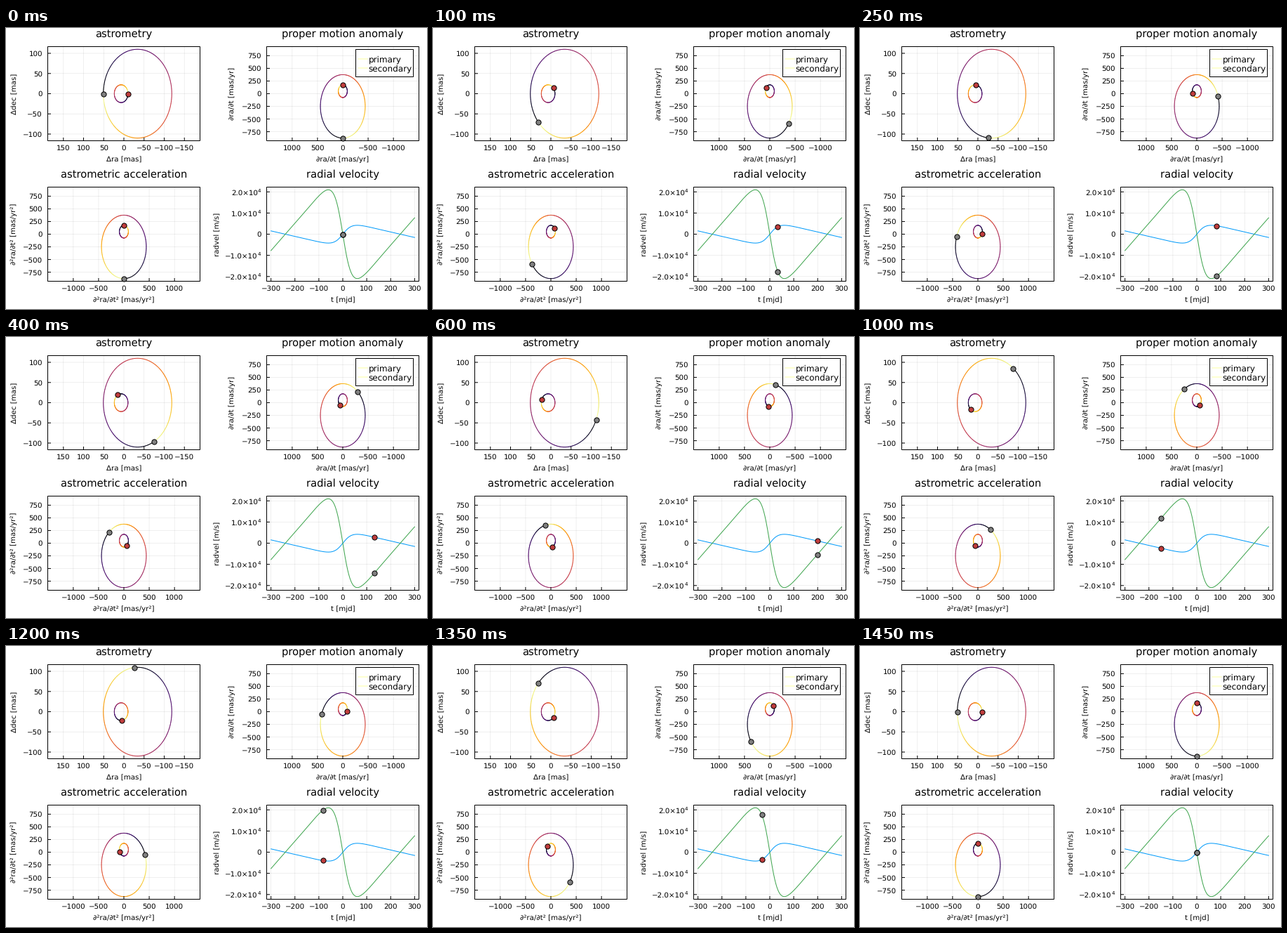
Animation of 600x400 px, one loop 1500 ms. Source, as a matplotlib script:

```python
import numpy as np
import matplotlib.pyplot as plt
from matplotlib.animation import FuncAnimation
from matplotlib.collections import LineCollection
from matplotlib.patches import Rectangle

plt.rcParams["font.family"] = "DejaVu Sans"
plt.rcParams["text.hinting"] = "none"

W, H = 600, 400
FRAMES, INTERVAL = 30, 50
PX = 0.72  # points per pixel at 100 dpi
PANEL_W, PANEL_H = 217, 134
SMALL, LEGEND, TITLE = 10.2, 12, 14.8
TICK = 4

# Orbit: 1.2 au around one solar mass at parallax 100 mas, inclined 45 degrees
SMA, ECC, PARALLAX = 1.2, 0.4, 100
TILT = np.cos(np.pi / 4)
MINOR = np.sqrt(1 - ECC**2)
PERIOD = 365.25 * SMA**1.5
RATE = 2 * np.pi / SMA**1.5  # rad per year
AU_PER_YEAR = 4740.5  # m/s
RATIO = -0.2  # primary motion relative to the secondary

RED, GRAY = "#c03d3d", "#808080"
BLUE, GREEN = "#009afa", "#3da44d"

fig = plt.figure(figsize=(W / 100, H / 100), dpi=100, facecolor="white")
ax = fig.add_axes([0, 0, 1, 1])
ax.set_xlim(0, W)
ax.set_ylim(H, 0)
ax.axis("off")


def ecc_anomaly(mean):
    """Solve Kepler's equation by Newton steps."""
    mean = np.asarray(mean, float)
    e = mean + ECC * np.sin(mean)
    for _ in range(20):
        e = e - (e - ECC * np.sin(e) - mean) / (1 - ECC * np.cos(e))
    return e


def position(e):
    a = SMA * PARALLAX
    return a * TILT * (np.cos(e) - ECC), -a * MINOR * np.sin(e)


def motion(e):
    k = SMA * PARALLAX * RATE / (1 - ECC * np.cos(e))
    return -k * TILT * np.sin(e), -k * MINOR * np.cos(e)


def radvel(e):
    k = SMA * RATE * AU_PER_YEAR * TILT
    return -k * np.sin(e) / (1 - ECC * np.cos(e))


def text(x, y, s, size=SMALL, ha="center", va="baseline", **kw):
    ax.text(x, y, s, fontsize=size * PX, ha=ha, va=va, zorder=8, **kw)


def line(xs, ys, color="black", width=1.0, **kw):
    return ax.plot(xs, ys, color=color, lw=width * PX, snap=False, **kw)[0]


def box(x, y, w, h, face="none", z=4):
    ax.add_patch(Rectangle((x, y), w, h, fc=face, ec="black", lw=PX,
                           snap=False, zorder=z))


def number(v):
    return f"{v:g}".replace("-", "\u2212")


def power_label(x, y, v):
    """Tick label such as 2.0x10^4, right aligned at x."""
    base = f"{v / 1e4:.1f}\u00d710".replace("-", "\u2212")
    text(x, y + 0.5, "4", SMALL * 0.7, "right")
    text(x - 4.7, y + 4.5, base, ha="right")


class Panel:
    def __init__(self, left, top, half_x, half_y, flip=False):
        self.left, self.top = left, top
        self.right, self.bottom = left + PANEL_W, top + PANEL_H
        self.cx, self.cy = left + PANEL_W / 2, top + PANEL_H / 2
        self.sx = PANEL_W / 2 / half_x * (-1 if flip else 1)
        self.sy = -PANEL_H / 2 / half_y
        box(left, top, PANEL_W, PANEL_H)

    def px(self, x, y):
        return self.cx + self.sx * x, self.cy + self.sy * y

    def decorate(self, title, xlabel, ylabel, xticks, yticks,
                 ylabel_x, powers=False):
        text(self.cx, self.top - 13.4, title, TITLE)
        text(self.cx, self.bottom + 29.6, xlabel)
        text(ylabel_x, self.cy, ylabel, ha="right", va="center", rotation=90)
        grid = dict(alpha=0.1, width=0.6, zorder=1)
        for v in xticks:
            x = self.px(v, 0)[0]
            line([x, x], [self.top, self.bottom], **grid)
            line([x, x], [self.bottom, self.bottom - TICK], zorder=4)
            text(x, self.bottom + 13.8, number(v))
        for v in yticks:
            y = self.px(0, v)[1]
            line([self.left, self.right], [y, y], **grid)
            line([self.left, self.left + TICK], [y, y], zorder=4)
            if powers and v:
                power_label(self.left - 8, y, v)
            else:
                text(self.left - 7.5, y + 3.8, number(v), ha="right")


def marker(color, z):
    return line([], [], marker="o", ms=7.2 * PX, mfc=color, mec="black",
                mew=PX, ls="none", zorder=z)


class OrbitTrack:
    """A body on its closed path, coloured from the body onward."""
    SWEEP = np.linspace(0, 2 * np.pi, 180)

    def __init__(self, panel, curve, scale, color, z):
        self.panel, self.curve, self.scale = panel, curve, scale
        self.path = LineCollection([], cmap="inferno", lw=PX,
                                   capstyle="round", zorder=z)
        self.path.set_snap(False)
        self.path.set_array(np.linspace(1, 0, len(self.SWEEP) - 1))
        self.path.set_clim(0, 1)
        ax.add_collection(self.path, autolim=False)
        self.dot = marker(color, z + 3)

    def update(self, mean):
        e = ecc_anomaly(mean) + self.SWEEP
        x, y = self.curve(e)
        pts = np.column_stack(self.panel.px(self.scale * x, self.scale * y))
        self.path.set_segments(np.stack([pts[:-1], pts[1:]], axis=1))
        self.dot.set_data(pts[:1, 0], pts[:1, 1])


class VelocityTrack:
    def __init__(self, panel, scale, line_color, color, z):
        self.panel, self.scale = panel, scale
        t = np.linspace(-300, 300, 400)
        v = scale * radvel(ecc_anomaly(2 * np.pi * t / PERIOD))
        line(*panel.px(t, v), color=line_color, zorder=z)
        self.dot = marker(color, z + 3)

    def update(self, mean):
        wrapped = (mean + np.pi) % (2 * np.pi) - np.pi
        v = self.scale * radvel(ecc_anomaly(wrapped))
        x, y = self.panel.px(wrapped * PERIOD / (2 * np.pi), v)
        self.dot.set_data([x], [y])


def panel_limits(reach):
    """Padded half ranges with equal scale on both axes."""
    half = 1.06 * reach
    return half * PANEL_W / PANEL_H, half


LEFT, RIGHT, TOP, LOW = 59.5, 371.5, 26.5, 226.5
sky = panel_limits(SMA * PARALLAX * MINOR)
speed = panel_limits(-motion(0)[1])
max_rv = np.abs(radvel(np.linspace(0, 2 * np.pi, 721))).max()

astrometry = Panel(LEFT, TOP, *sky, flip=True)
proper = Panel(RIGHT, TOP, *speed, flip=True)
accel = Panel(LEFT, LOW, *speed)
radial = Panel(RIGHT, LOW, 318, 1.06 * max_rv)

thousands, quarters = range(-1000, 1001, 500), range(-750, 751, 250)
astrometry.decorate("astrometry", "Δra [mas]", "Δdec [mas]",
                    range(-150, 151, 50), range(-100, 101, 50), 16.5)
proper.decorate("proper motion anomaly", "∂ra/∂t [mas/yr]", "∂ra/∂t [mas/yr]",
                thousands, quarters, 327.4)
accel.decorate("astrometric acceleration", "∂²ra/∂t² [mas/yr²]",
               "∂²ra/∂t² [mas/yr²]", thousands, quarters, 16.5)
radial.decorate("radial velocity", "t [mjd]", "radvel [m/s]",
                range(-300, 301, 100), range(-20000, 20001, 10000), 305.5,
                powers=True)

# Legend
box(498.5, 30.5, 82, 39, face="white", z=7)
for name, y in (("primary", 44), ("secondary", 57)):
    line([502, 515], [y, y], color="#fcffa4", zorder=8)
    text(516.5, y + 4.3, name, LEGEND, "left")

tracks = []
for panel, curve in ((astrometry, position), (proper, motion), (accel, motion)):
    tracks.append(OrbitTrack(panel, curve, RATIO, RED, 2))
    tracks.append(OrbitTrack(panel, curve, 1, GRAY, 2.5))
tracks.append(VelocityTrack(radial, RATIO, BLUE, RED, 2))
tracks.append(VelocityTrack(radial, 1, GREEN, GRAY, 2.5))


def update(i):
    mean = 2 * np.pi * (i % (FRAMES - 1)) / (FRAMES - 1)
    for track in tracks:
        track.update(mean)
    return []


anim = FuncAnimation(fig, update, frames=FRAMES, interval=INTERVAL,
                     init_func=lambda: update(0), repeat=True)
plt.show()
```
